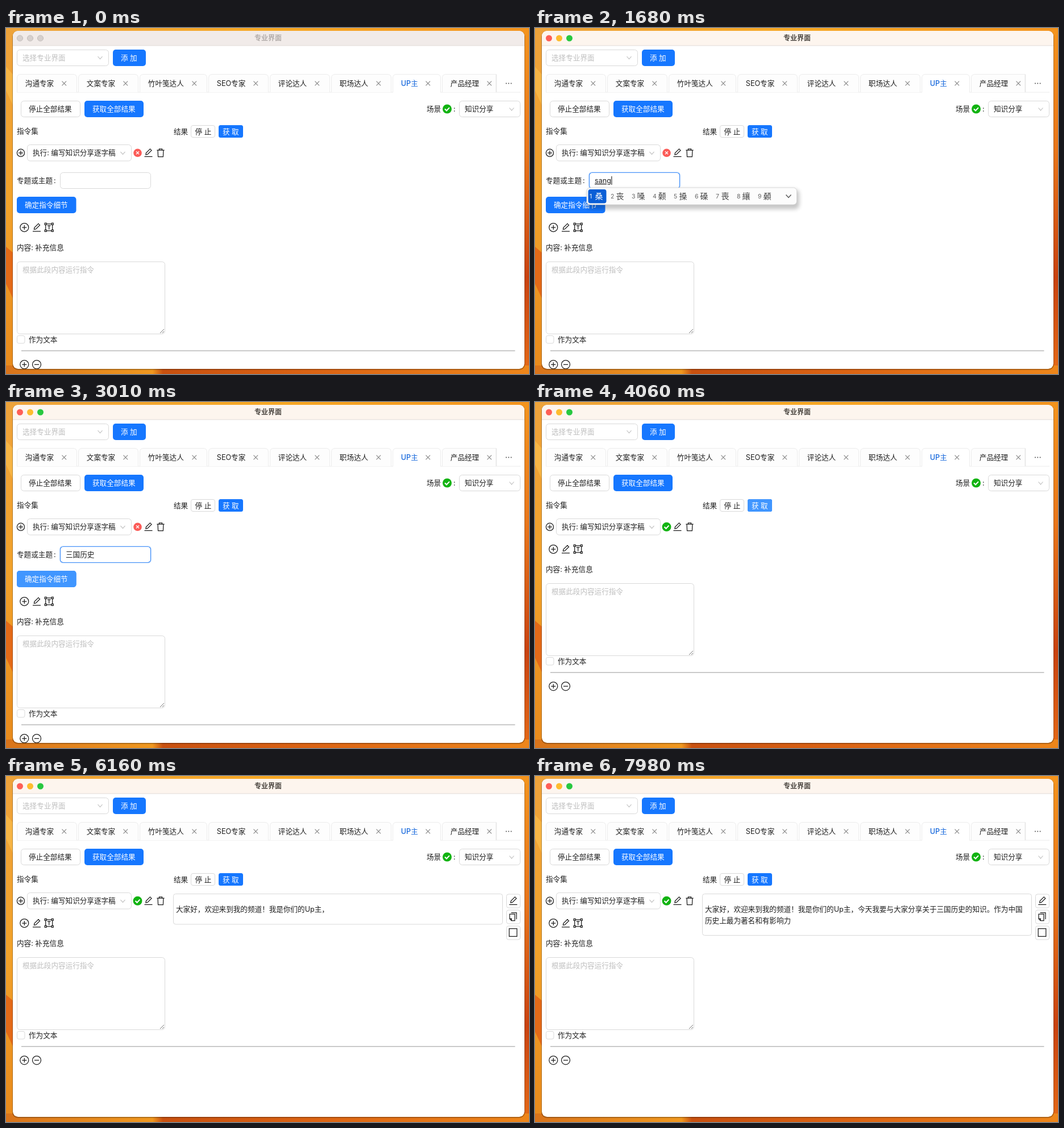
Animation, 920 px wide and 609 px high, one loop 8000 ms. Source, as an HTML page:

```html
<!DOCTYPE html>
<html lang="zh-CN">
<head>
<meta charset="utf-8">
<title>专业界面</title>
<style>
  html, body { margin: 0; width: 100%; height: 100%; overflow: hidden; }
  svg { display: block; width: 920px; height: 609px; }
  text { font: 12.6px Inter, "Noto Sans CJK SC", "Noto Sans CJK", sans-serif; fill: #1f1f1f; white-space: pre; }
  .hint { fill: #bfbfbf; }
  .white { fill: #fff; font-weight: 500; }
  .blue { fill: #1668dc; font-weight: 500; }
  .title { font-size: 12px; font-weight: 700; }
  .num { font-size: 10.5px; fill: #666; }
  .cand { font-size: 14px; fill: #444; }
  .pick { fill: #fff; }
  .icon { fill: none; stroke: #1c1c1c; stroke-width: 1.25; }
  .thin { fill: none; stroke: #bfbfbf; stroke-width: 1.1; }
  .cross { fill: none; stroke: #858585; stroke-width: 1.1; }
</style>
</head>
<body>
<script>
const BLUE = '#1677ff', LIGHT = '#4096ff', EDGE = '#d9d9d9';

// Drawing helpers returning SVG markup
const rect = (x, y, w, h, r, fill, more = '') =>
  `<rect x="${x}" y="${y}" width="${w}" height="${h}" rx="${r}" fill="${fill}" ${more}/>`;
const box = (x, y, w, h, r = 5, more = '') =>
  rect(x + .5, y + .5, w - 1, h - 1, r, '#fff', `stroke="${EDGE}" ${more}`);
const text = (x, mid, s, cls = '', more = '') =>
  `<text x="${x}" y="${mid + 4.6}" class="${cls}" ${more}>${s}</text>`;
const path = (x, y, d, cls = 'icon') =>
  `<path class="${cls}" transform="translate(${x} ${y})" d="${d}"/>`;
const dot = (x, y, r, fill, more = '') => `<circle cx="${x}" cy="${y}" r="${r}" fill="${fill}" ${more}/>`;
const group = (id, s, more = '') => `<g id="${id}" ${more}>${s}</g>`;
const poly = (points, fill) => `<polygon points="${points}" fill="${fill}"/>`;

const chevron = (x, y) => path(x, y, 'M-4-2L0 2.6L4-2', 'thin');
const close = (x, y) => path(x, y, 'M-3.8-3.8L3.8 3.8M3.8-3.8L-3.8 3.8', 'cross');
const ring = (x, y, r, sign) => dot(x, y, r, 'none', 'class="icon"') +
  path(x, y, sign === '+' ? 'M-4 0H4M0-4V4' : 'M-4 0H4');
const pencil = (x, y) => path(x, y, 'M-4.6 4L-4 .9L3-6.1L5.5-3.6L-1.5 3.4ZM-7 7.3H7');
const trash = (x, y) => path(x, y, 'M-6.6-4.4H6.6M-2.6-4.4V-6.8H2.6V-4.4M-4.9-4.4L-4.4 7H4.4L4.9-4.4');
const textBox = (x, y) => path(x, y,
  'M-4.5-6H4.5M-4.5 6H4.5M-6-4.5V4.5M6-4.5V4.5M-7.5-7.5h3v3h-3zM4.5-7.5h3v3h-3zM-7.5 4.5h3v3h-3zM4.5 4.5h3v3h-3zM-3-3H3M0-3V3.8');
const copy = (x, y) => path(x, y, 'M-6-4.3H3V7H-2.8L-6 3.8ZM-6 3.6H-2.6V7M-3.4-7H6V4.6');
const check = (x, y) => dot(x, y, 8, '#12b312') +
  `<path d="M${x - 4} ${y}l3 3l5-5.4" fill="none" stroke="#fff" stroke-width="2"/>`;
const button = (x, y, w, h, tx, label, r = 5) =>
  rect(x, y, w, h, r, BLUE) + text(tx, y + h / 2, label, 'white');

const wallpaper = () =>
  `<defs>
    <linearGradient id="left" x2="0" y2="1"><stop stop-color="#efa33c"/><stop offset=".5" stop-color="#f2a22b"/>
      <stop offset="1" stop-color="#e88a1c"/></linearGradient>
    <linearGradient id="right" x2="0" y2="1"><stop stop-color="#f3931d"/><stop offset=".35" stop-color="#e9761a"/>
      <stop offset=".72" stop-color="#c9420f"/><stop offset="1" stop-color="#e56a17"/></linearGradient>
    <linearGradient id="top"><stop stop-color="#eda33b"/><stop offset=".5" stop-color="#f7a824"/>
      <stop offset="1" stop-color="#f3931d"/></linearGradient>
    <linearGradient id="bottom"><stop stop-color="#d9741b"/><stop offset=".28" stop-color="#f0981f"/>
      <stop offset=".3" stop-color="#c8500f"/><stop offset=".6" stop-color="#dc6413"/>
      <stop offset="1" stop-color="#ee861a"/></linearGradient>
    <filter id="soft" x="-20%" y="-50%" width="140%" height="220%"><feGaussianBlur stdDeviation="3.5"/></filter>
    <clipPath id="frame">${rect(12, 5, 900, 595, 9, '#000')}</clipPath>
    <clipPath id="tabs">${rect(19, 78, 844, 40, 0, '#000')}</clipPath>
  </defs>` +
  rect(0, 0, 460, 609, 0, 'url(#left)') + rect(460, 0, 460, 609, 0, 'url(#right)') +
  rect(0, 0, 920, 12, 0, 'url(#top)') + rect(0, 594, 920, 15, 0, 'url(#bottom)') +
  poly('0,385 14,397 14,480 0,450', '#e46a18') + poly('0,68 14,84 14,140 0,110', '#f7b545');

const titleBar = () =>
  rect(12, 5, 900, 26, 0, '#f1ebe9', 'id="bar"') + rect(12, 30.5, 900, 1, 0, '#e2dbd7') +
  group('idle', [24.5, 42.5, 60.5].map(x => dot(x, 18, 5.1, '#d6d0ce', 'stroke="#bab4b2" stroke-width=".8"')).join('')) +
  group('lit', ['#fe5f57', '#febc2e', '#28c840'].map((c, i) => dot(24.5 + 18 * i, 18, 5.5, c)).join('')) +
  text(437, 17.6, '专业界面', 'title', 'id="title"');

const TABS = [
  [19, 106, '沟通专家'], [127, 106, '文案专家'], [235, 119, '竹叶笺达人'], [356, 106, 'SEO专家'],
  [464, 106, '评论达人'], [572, 106, '职场达人'], [680, 85, 'UP主'], [767, 106, '产品经理']
];
const tab = ([x, w, label]) => {
  const on = label === 'UP主', r = x + w - .5;
  return `<path d="M${x + .5} 113V88q0-6.5 6.5-6.5H${r - 6.5}q6.5 0 6.5 6.5V113" fill="${on ? '#fff' : '#fdfdfd'}" stroke="#ececec"/>` +
    (on ? rect(x + 1, 112, w - 2, 2, 0, '#fff') : '') +
    text(x + 14.8, 97, label, on ? 'blue' : '') + close(x + w - 22.7, 97.5);
};

const header = () =>
  box(19, 38, 162, 29) + text(29, 52, '选择专业界面', 'hint') + chevron(165.5, 52) +
  button(188, 38, 58, 29, 202, '添 加') +
  rect(19, 112.6, 886, 1, 0, '#ececec') +
  `<g clip-path="url(#tabs)">${TABS.map(tab).join('')}</g>` +
  rect(861, 82, 1, 31, 0, '#f4f4f4') + rect(862, 82, 1.2, 31, 0, '#e4e4e4') +
  [880, 884.3, 888.6].map(x => dot(x, 97.5, .9, '#444')).join('') +
  box(26, 128, 105, 29) + text(40, 142.4, '停止全部结果') +
  button(138, 128, 104, 29, 152, '获取全部结果') +
  text(740, 142.4, '场景') + check(776, 142.5) + text(787, 142.4, ':') +
  box(797, 128, 108, 29) + text(807, 142.4, '知识分享') + chevron(889.5, 142.5) +
  text(19, 181, '指令集') + text(295, 182, '结果') +
  box(325, 171, 43, 22, 3.5) + text(332.5, 182, '停 止') +
  rect(374, 171, 43, 22, 3.5, BLUE, 'id="wave"') + rect(374, 171, 43, 22, 3.5, BLUE) +
  rect(374, 171, 43, 22, 3.5, LIGHT, 'id="getHover"') + text(381, 182, '获 取', 'white');

const command = () =>
  ring(26, 219.8, 6.6, '+') + box(37, 205, 184, 29.5) + text(47, 219.8, '执行: 编写知识分享逐字稿') + chevron(205.5, 219.8) +
  group('bad', dot(231.5, 219.8, 7.3, '#fb5b57') +
    path(231.5, 219.8, 'M-2.5-2.5L2.5 2.5M2.5-2.5L-2.5 2.5" style="stroke:#fff')) +
  group('good', check(231.5, 219.8)) + pencil(250.5, 219) + trash(272, 219.6);

const details = () =>
  text(19, 268.4, '专题或主题') + text(84, 268.4, ':') + box(95, 254, 160, 29) +
  group('focus', rect(93.6, 252.6, 162.8, 31.8, 6.5, '#e6f1ff') +
    rect(95.5, 254.5, 159, 28, 5, '#fff', 'stroke="#3d8cf7" stroke-width="1.2"')) +
  text(105, 268.4, '', '', 'id="entry"') + rect(0, 261, 1, 15, 0, '#000', 'id="caret"') +
  rect(19, 297, 104.5, 29, 5, BLUE) + rect(19, 297, 104.5, 29, 5, LIGHT, 'id="okHover"') +
  text(33, 311.8, '确定指令细节', 'white');

const content = () =>
  ring(32.3, 351, 7.5, '+') + pencil(54, 350.5) + textBox(75.7, 350.8) +
  text(19, 386.5, '内容: 补充信息') +
  box(19, 411, 261, 128) + text(29, 425.5, '根据此段内容运行指令', 'hint') +
  path(278, 537, 'M-7 0L0-7M-3 0L0-3" style="stroke:#777;stroke-width:1') +
  box(19, 541, 14.5, 14.5, 3) + text(40, 548.7, '作为文本') +
  rect(27, 567.6, 868.5, 1, 0, '#969696') + ring(32.3, 592.3, 7.5, '+') + ring(54, 592.3, 7.5, '-');

const result = () =>
  box(294, 207, 580, 54.5, 4, 'id="answer"') +
  text(299, 234.3, '', '', 'id="line1"') + text(299, 254.4, '', '', 'id="line2"') +
  [208, 236, 264].map(y => box(880, y - .5, 25, 25, 3.5)).join('') +
  pencil(892.3, 219) + copy(892, 247.5) + path(892, 275.5, 'M-6.8-6.8H6.8V6.8H-6.8Z');

const popup = () =>
  rect(92, 284, 373, 35, 8, '#000', 'opacity=".22" filter="url(#soft)"') +
  rect(91, 281, 369.5, 30, 6, '#fcfcfc', 'stroke="#cfcfcf" stroke-width=".8"') +
  group('cands', '') + path(446, 296, 'M-4.5-2.4L0 2.4L4.5-2.4" style="stroke:#555;stroke-width:1.4');

const book = x => rect(x, 290, 18, 12, 1.5, '#6d8ba8') +
  `<path d="M${x + 1} 291q4-2 8 1q4-3 8-1v9q-4-2-8 1q-4-3-8-1z" fill="#f4f1e8" stroke="#999" stroke-width=".6"/>` +
  path(x, 296, 'M9-4V4M3-2h4M3 1h4M11-2h4M11 1h4', 'cross');
const keycap = x => rect(x, 287, 18, 17.5, 3.5, '#5d88b4') +
  text(x + 5, 295.8, '3', 'white', 'style="font-weight:700"');
const EMOJI = { B: book, K: keycap };

function candidates(list) {
  let x = 96;
  return list.split(' ').map((word, i) => {
    const emoji = EMOJI[word], w = emoji ? 19 : 14 * word.length, pick = i ? '' : ' pick';
    const s = (i ? '' : rect(93.5, 284, w + 18, 24.5, 4, '#0a5ed6')) +
      text(x, 295.8, i + 1, 'num' + pick) +
      (emoji ? emoji(x + 10) : text(x + 9.5, 296, word, 'cand' + pick));
    x += w + 23;
    return s;
  }).join('');
}

document.body.innerHTML = `<svg viewBox="0 0 920 609">` + wallpaper() +
  rect(11, 5, 902, 597, 10, '#000', 'opacity=".25"') +
  `<g clip-path="url(#frame)">` + rect(12, 5, 900, 595, 9, '#fff') + titleBar() + header() + command() +
  group('details', details()) + group('content', content()) + group('result', result()) + `</g>` +
  group('popup', popup()) + `</svg>`;

const el = {};
document.querySelectorAll('[id]').forEach(e => el[e.id] = e);
const set = (e, attrs) => { for (const k in attrs) e.setAttribute(k, attrs[k]); };
const show = (e, on) => set(e, { display: on ? 'inline' : 'none' });
const ramp = (t, a, b) => Math.min(1, Math.max(0, (t - a) / (b - a)));

// Start time, composed letters, candidate list
const TYPING = [
  [0, '', ''],
  [630, 's', '书 B 是 三 K 刷 说 上'],
  [1260, 'sa', '撒 洒 萨 仨 卅 飒 挲 脎 靸'],
  [1400, 'san', '三 K 散 伞 叁 糁 馓 毵'],
  [1540, 'sang', '桑 丧 嗓 颡 搡 磉 喪 纕 顙'],
  [1750, 'san gu', '三顾 三股 三 散 伞 叁'],
  [1820, 'san guo', '三国 三过 三 散 伞 叁'],
  [2030, 'san guo l', '三国里 三国 三 散 伞 叁'],
  [2240, 'san guo li', '三国里 三国 三过 三 散 伞'],
  [2310, 'san guo li sh', '三国历史 三国 三过 三 散'],
  [2380, 'san guo li shi', '三国历史 三国 三过 三 散'],
  [2450, '三国历史', '']
];

const ANSWER = '大家好，欢迎来到我的频道！我是你们的Up主，今天我要与大家分享关于三国历史的知识。作为中国历史上最为著名和有影响力';
const WRAP = 45;
// Time and number of characters streamed so far
const STREAM = [[5390, 4], [6020, 20], [6160, 22], [6790, 36], [6930, 38], [7490, 50]];
const BURSTS = [[7700, 52], [7840, 55], [7980, 57]];

function streamed(t) {
  if (t < 5390) return 0;
  const burst = BURSTS.filter(b => t >= b[0]).pop();
  if (burst) return burst[1];
  const q = Math.floor(t / 70) * 70;
  let n = 4;
  for (let i = 1; i < STREAM.length; i++) {
    const [a, from] = STREAM[i - 1], [b, to] = STREAM[i];
    if (q >= a) n = from + Math.floor((to - from) * ramp(q, a, b));
  }
  return n;
}

let shown = -1;
function typing(t) {
  const k = TYPING.findLastIndex(s => t >= s[0]);
  if (k === shown) return;
  shown = k;
  const [, letters, list] = TYPING[k];
  el.entry.textContent = letters;
  el.entry.style.textDecoration = list ? 'underline' : 'none';
  set(el.caret, { x: 105.5 + (letters ? el.entry.getComputedTextLength() : 0) });
  show(el.popup, list);
  el.cands.innerHTML = list ? candidates(list) : '';
}

function render(t) {
  const active = t >= 70, done = t >= 3150;
  set(el.bar, { fill: active ? '#fdf5ee' : '#f1ebe9' });
  el.title.style.fill = active ? '#4b4641' : '#b3adab';
  show(el.idle, !active);
  show(el.lit, active);

  typing(t);
  set(el.focus, { opacity: ramp(t, 140, 340) });
  show(el.caret, t >= 140 && t < 2765);
  set(el.okHover, { opacity: ramp(t, 2900, 3010) });

  show(el.details, !done);
  show(el.bad, !done);
  show(el.good, done);
  set(el.content, { transform: `translate(0 ${done ? -92 : 0})` });

  set(el.getHover, { opacity: ramp(t, 3850, 4050) - ramp(t, 4430, 4650) });
  const grow = 5 * (1 - (1 - ramp(t, 4130, 4490)) ** 4);
  set(el.wave, {
    x: 374 - grow, y: 171 - grow, width: 43 + 2 * grow, height: 22 + 2 * grow, rx: 3.5 + grow,
    opacity: t < 4130 ? 0 : .2 * (1 - ramp(t, 4130, 5040)) ** 2
  });

  const n = streamed(t);
  show(el.result, n);
  el.line1.textContent = ANSWER.slice(0, Math.min(n, WRAP));
  el.line2.textContent = ANSWER.slice(WRAP, Math.max(n, WRAP));
  set(el.answer, { height: n > WRAP ? 73 : 53.5 });
}

const start = performance.now();
function tick() {
  render((performance.now() - start) % 8000);
  requestAnimationFrame(tick);
}
tick();
</script>
</body>
</html>
```
